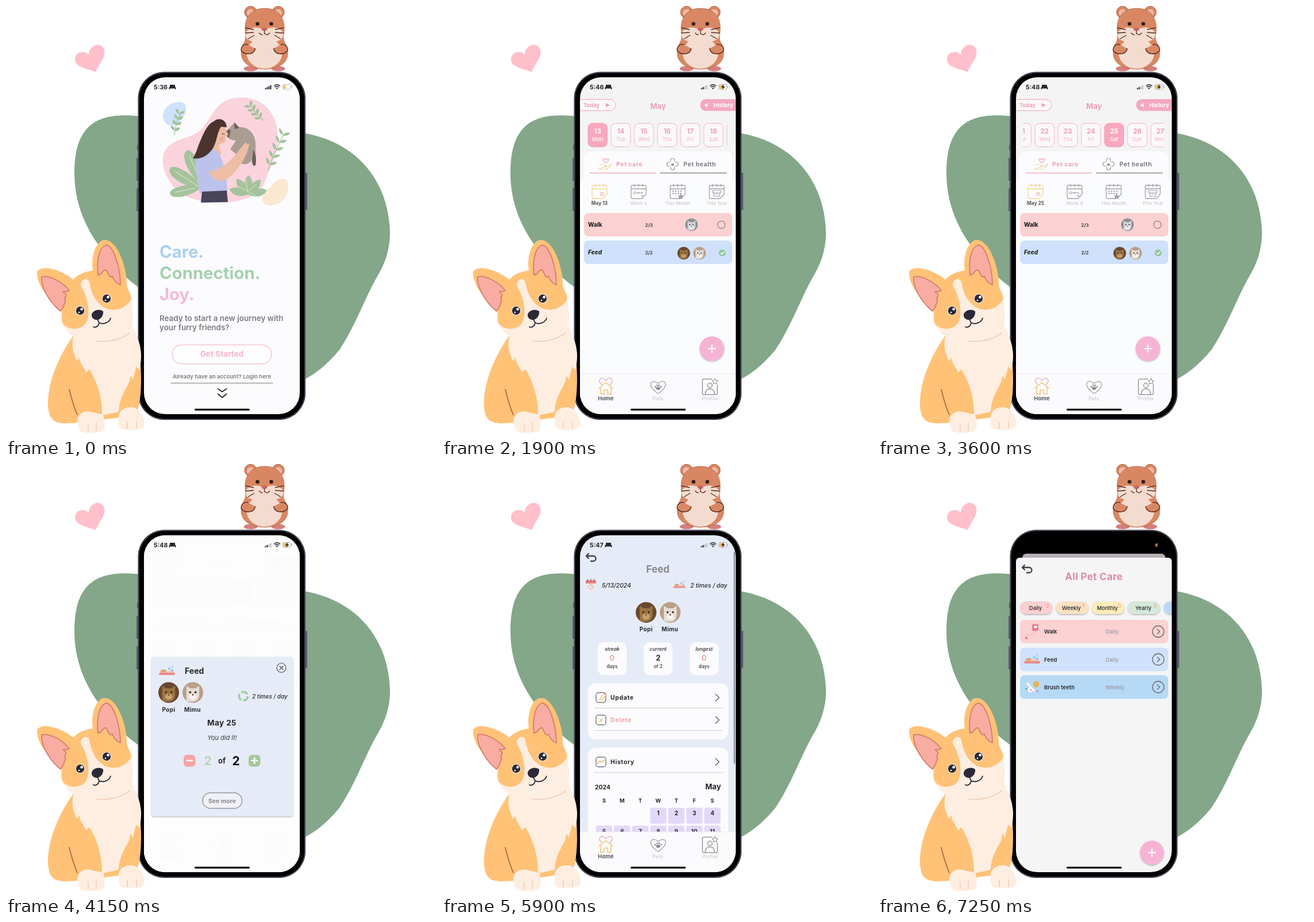
Write an HTML page that moves like this. It is 748 px wide and 748 px high and loops after 8000 ms.

```html
<!DOCTYPE html>
<html lang="en">
<head>
<meta charset="utf-8">
<title>Pet care app</title>
<style>
html,body{margin:0;width:100%;height:100%;overflow:hidden;background:#fff}
svg{display:block;width:100vw;height:100vh}
text{font-family:Inter,"Liberation Sans",sans-serif}
</style>
</head>
<body>
<svg id="stage" viewBox="0 0 748 748"></svg>
<script>
const stage = document.getElementById('stage');
const INK = '#27272b', PINK = '#ee9fb8', GREY = '#7b7b80', PALE = '#d3d3d6';
const PETS = ['Popi', 'Mimu'];

// Drawing helpers
const text = (x, y, size, str, fill = INK, {w = 700, mid, it, ls = 0} = {}) =>
  `<text x="${x}" y="${y}" font-size="${size}" font-weight="${w}" fill="${fill}" letter-spacing="${ls}"` +
  `${mid ? ' text-anchor="middle"' : ''}${it ? ' font-style="italic"' : ''}>${str}</text>`;
const mid = (x, y, size, str, fill, opt) => text(x, y, size, str, fill, {mid: 1, ...opt});
const rect = (x, y, w, h, r, fill, extra = '') =>
  `<rect x="${x}" y="${y}" width="${w}" height="${h}" rx="${r}" fill="${fill}" ${extra}/>`;
const oval = (x, y, rx, ry, fill, extra = '') =>
  `<ellipse cx="${x}" cy="${y}" rx="${rx}" ry="${ry}" fill="${fill}" ${extra}/>`;
const dot = (x, y, r, fill, extra) => oval(x, y, r, r, fill, extra);
const path = (d, fill, extra = '') => `<path d="${d}" fill="${fill}" ${extra}/>`;
const line = (d, color, w = 1, fill = 'none') =>
  path(d, fill, `stroke="${color}" stroke-width="${w}" stroke-linecap="round" stroke-linejoin="round"`);
const edge = (color, w = 1) => `stroke="${color}" stroke-width="${w}"`;
const group = (body, attrs = '') => `<g ${attrs}>${body}</g>`;
const at = (x, y, body) => group(body, `transform="translate(${x} ${y})"`);
const each = (n, fn) => Array.from({length: n}, (_, i) => fn(i)).join('');
const SHADOW = 'filter="url(#shadow)"';

const leaf = (x, y, len, w, angle, fill = '#a4c39b') =>
  path(`M0 0Q${len * .55} ${-w} ${len} 0Q${len * .55} ${w} 0 0`, fill, `transform="translate(${x} ${y}) rotate(${angle})"`);
const frond = (x, y, len, w, angle) => group(
  path(`M0 0C${len * .4} ${-w} ${len} ${-w} ${len} 0C${len} ${w * .7} ${len * .4} ${w} 0 0`, '#a4c39b') + line(`M4 0H${len * .85}`, '#dfecd5', 1),
  `transform="translate(${x} ${y}) rotate(${angle})"`);
const sprig = (x, y, len, angle, pairs, size) => group(
  line(`M0 0Q${len / 2} -4 ${len} 0`, '#9bbb93', 1.2) +
  each(pairs, i => {
    const p = len * (i + .7) / pairs;
    return leaf(p, -2, size, 5, -48) + leaf(p, -2, size, 5, 48);
  }), `transform="translate(${x} ${y}) rotate(${angle})"`);

function scenery() {
  const blob = path('M235 192C160 183 119 205 119 290C119 340 136 382 164 420C188 453 211 478 240 495L470 660' +
    'C505 664 546 640 580 598C609 555 625 505 649 465C663 440 668 416 668 395C666 300 605 232 510 220Z', '#83a788');
  const heart = path('M156 115C141 108 119 108 120 91C122 78 139 77 144 85C144 69 163 61 170 74C176 88 162 99 156 115Z', '#ffbfcb');
  return blob + heart;
}

function hamster() {
  const fur = '#d98763', brown = '#55291d', cream = '#f3dccf', foot = '#d67f7f';
  const side = (s, body) => group(body, `transform="translate(449.5 0) scale(${s} 1)"`);
  const half = s => side(s,
    oval(24, 109, 12, 4.5, foot) + dot(24, 11, 10.5, fur, edge('#a95c40')) + dot(24, 12, 6.5, '#f0b9a5'));
  const front = s => side(s,
    oval(15, 50, 18, 12.5, cream) + dot(12, 31, 3.3, '#33211d') +
    line('M16 74C18 85 33 86 40 78C42 72 36 65 29 67', brown, 1.4, fur) +
    line('M0 47Q4 53 9 47M19 41L33 38M19 46L33 47M18 51L28 57', brown, 1.3));
  return half(-1) + half(1) +
    path('M450 4C474 4 484 20 484 38C484 50 481 55 484 62C494 78 497 108 450 110C403 108 405 78 415 62C418 55 416 50 416 38C416 20 426 4 450 4Z', fur, edge('#b2684a', .8)) +
    oval(449.5, 82, 31, 27, cream) + front(-1) + front(1) +
    oval(449.5, 40.5, 5, 3, '#c4685c') + line('M449.5 43V48', brown, 1.3);
}

function corgi() {
  const gold = '#ffc277', cream = '#fdeee1', pink = '#f9aca2', rim = '#d27d6d', dark = '#2b2937';
  const eye = (x, y) => dot(x, y, 8.3, cream) + dot(x, y, 7.2, dark) + dot(x + 2.6, y - 2.6, 2.3, '#fff') + dot(x - 2, y + 3, 1.3, '#fff');
  return path('M118 572C95 604 73 650 73 690C73 718 82 726 104 726L128 725L225 712C237 690 237 640 231 590Z', gold) +
    path('M117 575C113 598 119 605 123 617C127 617 125 612 127 611C130 625 137 630 139 637C142 636 143 633 145 632C158 652 168 682 167 712L196 706C196 686 206 670 214 655C216 648 215 645 217 644L221 650C222 640 226 634 226 627L232 633C235 622 236 606 234 597C233 585 225 568 218 552Z', cream) +
    path('M124 725C124 709 135 704 147 706L169 711C174 725 173 741 163 741C150 744 132 744 128 737Z', cream) +
    path('M196 722C194 705 204 698 218 698C233 699 241 714 241 728C240 738 221 739 207 737C198 737 196 732 196 722Z', cream) +
    line('M110 667C115 687 119 700 124 711', '#a9683e', 1.7) +
    line('M143 739V727M157 739V725M211 735V724M227 735V723', '#efcdb7', 1.5) +
    path('M97 548C95 537 99 531 96 526C73 510 53 485 54 463C60 447 101 461 117 476C126 466 138 462 151 460C147 435 157 408 171 407C193 405 211 455 210 485C211 494 218 500 218 510C219 550 185 579 130 574C114 571 100 562 97 548Z', gold) +
    line('M62 471C77 467 101 483 110 495C105 499 99 494 100 498C108 502 104 506 102 507C107 515 99 518 101 521L95 531C78 518 60 490 62 471Z', rim, 1.8, pink) +
    line('M160 468C157 440 163 419 174 416C187 416 199 455 199 485C191 482 188 477 185 470C179 475 177 461 174 459C168 458 167 468 160 468Z', rim, 1.8, pink) +
    path('M131 480C136 473 143 473 145 481C149 503 158 518 174 526C193 533 210 524 218 510C220 526 223 544 219 556C208 577 181 584 148 584C121 582 103 567 97 549C105 565 128 565 138 553C149 539 142 505 131 488Q129 484 131 480Z', cream) +
    eye(129, 530) + eye(175, 509) +
    path('M149 539C148 530 162 525 169 531C170 539 164 546 158 546C153 546 150 543 149 539Z', dark) +
    line('M159 545L162 551C161 558 155 560 152 558M162 551C170 555 180 550 182 543', dark, 1.8) +
    line('M157 583C178 585 199 580 215 569', '#f0cdb8', 1.7);
}

function phone() {
  const key = (x, y, h) => rect(x, y, 3, h, 1, '#615d70');
  return key(228, 241, 10) + key(227, 264, 40) + key(227, 317, 40) + key(521, 290, 65) +
    rect(229.5, 114.5, 291.5, 605.5, 46, '#37343f') +
    rect(231, 116, 288.5, 602.5, 44.5, '#000', edge('#57536a', 1));
}

function statusBar(time, charging) {
  const bars = each(4, i => rect(450.5 + i * 3, 142.5 - i * 1.6, 2, 2.5 + i * 1.6, .5, charging && i > 1 ? '#bbb' : INK));
  return text(257, 145, 10.7, time) +
    path('M285 137H294V140L295.5 142V145H294V143.5H285V145H283.5V142L285 140Z', INK) + bars +
    line('M466.5 139Q471.5 134.5 476.5 139M468.5 141Q471.5 138.5 474.5 141', INK, 1.5) + dot(471.5, 143.3, 1.3, INK) +
    rect(481.5, 136.5, 14, 8.5, 2.5, charging ? '#f6f0e8' : '#fff', edge('#aaa', .8)) +
    rect(482.5, 137.5, charging ? 6 : 4, 6.5, 1.5, '#f6bd62') + rect(496.5, 139, 1.2, 3.5, .5, '#aaa') +
    (charging ? path('M490 136L485.5 141.5H488.5L487.5 145.5L492.5 140H489.5Z', INK) : '');
}

const back = (x, y) => at(x, y, line('M5 0L1 4L5 8M1 4H13C19 4 19 13 13 13H9', '#3f3f44', 2.3));
const fab = (x, y, r) => dot(x, y, r, '#f6b4d5', SHADOW) + line(`M${x - 6} ${y}H${x + 6}M${x} ${y - 6}V${y + 6}`, '#fff', 2.2);
const chevron = (x, y) => line(`M${x - 3} ${y - 6}L${x + 3} ${y}L${x - 3} ${y + 6}`, '#66666b', 1.5);

function avatar(x, y, r, [bg, fur, light]) {
  return dot(x, y, r, bg) + group(
    path('M-.62 .75V-.65L-.25-.4H.25L.62-.65V.35Q.5 .9 0 .9T-.62 .75Z', fur) +
    oval(0, .4, .36, .3, light) + dot(-.26, -.02, .1, '#3c3029') + dot(.26, -.02, .1, '#3c3029') + dot(0, .22, .08, '#6a4a40'),
    `transform="translate(${x} ${y}) scale(${r})"`);
}
const DOG = ['#8d9095', '#d4d5da', '#ececef'], TABBY = ['#68482f', '#9b7342', '#c6a16b'], WHITE = ['#b99f87', '#e5ddd5', '#f6f2ee'];

function bowl(x, y, s = 1) {
  return group(rect(-14, 3, 28, 4, 2, '#e88985') + rect(-12, 0, 24, 3, 1, '#f4c3ba') + oval(-6, 0, 5, 2.5, '#dba66f') +
    dot(4, -4, 2, '#8fc2e8') + dot(9, -7, 1.7, '#a8d1ef') + dot(9, -1, 2, '#8fc2e8'),
    `transform="translate(${x} ${y}) scale(${s})"`);
}

function bottomBar() {
  const heart = 'M0 5C-18-7-9-17 0-9C9-17 18-7 0 5Z';
  return rect(240, 640, 271, 70, 0, '#fbfbfd') + rect(240, 639.5, 271, 1, 0, '#ececef') +
    at(285, 663, line('M-7-4C-18-14-4-20 0-11C4-20 18-14 7-4', '#e5b3bf', 1.4) +
      line('M-12 2L0-8L12 2M-9 1V12H-3V5H3V12H9V1', '#f3d193', 2)) +
    at(376, 665, group(line(heart, '#a5a5a9', 1.1), 'transform="translate(0 3) scale(1.25)"') +
      oval(0, 0, 3.5, 2.8, '#8b8b90') + each(4, i => dot(-5 + i * 3.3, i % 3 ? -5 : -2.5, 1.4, '#8b8b90'))) +
    at(466, 662, line('M4-13H-10Q-13-13-13-10V11Q-13 14-10 14H10Q13 14 13 11V-3M-8 13Q-8 4 0 4T8 13', '#9a9a9f', 1.5) +
      dot(0, -2, 4, 'none', edge('#9a9a9f', 1.5)) + line('M9-14L10.5-11L14-10L11.5-8L12-4.5L9-6L6-4.5L6.5-8L4-10L7.5-11Z', '#9a9a9f', 1.1)) +
    mid(285, 686, 9.5, 'Home', '#58585d') + mid(375.5, 686, 9, 'Pets', PALE, {w: 600}) + mid(466, 686, 9, 'Profile', PALE, {w: 600});
}

function welcome() {
  const skin = '#eebda5', hair = '#4b342d', cat = '#a99d91', dusk = '#6c5c55';
  const art = path('M408 159C450 158 473 190 473 228C473 262 458 280 452 302C440 334 405 342 372 342C330 343 296 328 283 302C272 284 268 262 280 247C296 228 324 232 342 212C362 188 366 160 408 159Z', '#fad3dd') +
    path('M300 167C318 166 315 185 306 197C297 210 281 212 275 199C268 184 282 168 300 167Z', '#cfe2fb') +
    path('M478 301C492 298 494 317 487 331C480 346 455 353 447 341C440 327 456 321 462 312C467 306 470 302 478 301Z', '#fbe8d0') +
    sprig(293, 224, 40, -74, 4, 11) + sprig(448, 199, 36, -130, 4, 11) + sprig(456, 286, 70, -66, 5, 14) +
    frond(342, 314, 58, 13, 168) + frond(341, 318, 66, 15, 213) + frond(341, 312, 66, 15, 247) +
    each(5, i => leaf(421, 328, 34, 14, 196 + i * 38)) + line('M440 334L420 322L417 303M420 322L403 314M420 322L435 311', '#dfecd5', .9) +
    path('M385 216L397 203L404 211C423 209 436 224 434 247L435 270C432 281 427 276 429 266C421 281 402 277 402 259L390 249L400 234C390 234 383 228 382 222Z', cat) +
    path('M397 202L406 212L398 214ZM383 218Q386 214 391 216L388 229Q381 226 383 218ZM430 250Q437 262 434 277Q429 281 428 270Z', dusk) +
    path('M361 215C368 203 381 205 383 217L387 224L382 227L382 235C377 241 371 239 370 243L375 258L354 256Z', skin) +
    path('M332 258C342 244 366 245 372 259L382 286L385 323L337 326C333 300 326 274 332 258Z', '#bbc3ea') +
    path('M341 323L384 321L386 341L339 342Z', '#48445a') +
    path('M353 288C371 286 391 271 405 251L417 237L420 241L424 239L418 258C408 278 393 299 379 303C366 306 355 298 353 288Z', skin) +
    path('M384 211C383 196 369 193 361 201C349 206 343 224 337 237C332 249 332 254 325 265C341 268 357 257 363 241C367 231 368 219 374 210Z', hair) +
    line('M376 222L380 223', hair, 1.1) + dot(375, 231, 3, '#eba795');
  return rect(240, 124, 271, 586, 0, '#fcfcfe') + statusBar('5:36') + art +
    text(267, 438, 29.3, 'Care.', '#aad0f1') + text(267, 475, 29.3, 'Connection.', '#a6d0af') + text(267, 512, 29.3, 'Joy.', '#f7b8d5') +
    text(267, 548, 13.4, 'Ready to start a new journey with', GREY, {w: 600}) + text(267, 564, 13.4, 'your furry friends?', GREY, {w: 600}) +
    rect(289, 589.5, 173, 33, 16.5, '#fdfdff', edge('#f5c4d5', 1.5)) + mid(375.5, 609.5, 13.6, 'Get Started', '#f3b4cc') +
    mid(375.5, 648, 9.6, 'Already have an account? Login here', GREY, {w: 600}) + line('M287 656H464', '#77777b', 1.2) +
    line('M369 666L376 671L383.5 666M369 675L376 681L383.5 675', INK, 2);
}

function sheet(bg) {
  return rect(240, 124, 271, 586, 0, '#000') + rect(251, 156, 249, 30, 7, '#b4afb4') +
    path('M240 170Q240 163 247 163H504Q511 163 511 170V710H240Z', bg) +
    rect(482.5, 138.5, 4, 5, 1, '#d89a50') + rect(485, 140, 2, 2, 0, '#222') + back(250, 176);
}

function signIn() {
  const pencil = group(rect(-2, -13, 20, 27, 6, '#fab9c6') + rect(15, -13, 12, 27, 0, '#c9ccd0') + rect(27, -13, 66, 27, 0, '#cfe1f8') +
    rect(27, 7, 66, 7, 0, '#a9bdd6') + path('M93-13L116 3L93 14Z', '#fbd59a') + path('M107-3L119 5L106 9Z', '#f7afbd'),
    'transform="translate(322 231) rotate(40)"');
  const art = oval(383, 262, 24, 26, '#fae4f4') + line('M337 281Q352 270 367 292', '#b9c6e6', 8) +
    path('M336 228L327 195Q340 192 355 201ZM384 193Q400 179 413 182Q416 196 410 207Z', '#bcc4e8') +
    path('M340 222L329 198Q338 199 349 206ZM398 195Q407 186 412 186L408 203Z', '#fbe0f1') +
    path('M340 234C330 211 351 193 377 191C404 190 420 207 418 226C415 247 396 256 375 255C356 255 346 247 340 234Z', '#cfe2fa') +
    path('M341 232Q334 213 348 200Q341 220 350 246Z', '#9cbbd0') + pencil +
    line('M341 266L349 262M380 265Q393 264 397 255', '#b5bfe4', 11) +
    line('M361 231Q364 226 369 230M395 228Q398 223 402 226M376 229Q379 233 381 229Q384 233 387 228M352 238L363 235M355 243L364 239M402 232L413 229M403 235L413 235', '#3f4257', 1.8) +
    oval(365, 238, 5, 3, '#f4c8e4') + oval(402, 237, 4, 3, '#f4c8e4');
  const field = (y, label) => rect(271.5, y, 208, 34, 5, '#fcfcfe', edge('#f0ccd6', 1.3)) + text(279, y + 20.5, 9.5, label, '#d2d5da', {w: 400});
  return sheet('#fbfcff') + art + mid(375, 365, 17, 'Sign in', '#de8299', {ls: .3}) + field(392, 'Username') + field(440.5, 'Password') +
    rect(333, 510, 85, 35, 17.5, '#f7b6d6', SHADOW) + mid(375.5, 531, 10.7, 'Submit') +
    mid(375.5, 573, 11.1, 'Create Account', '#e192a9') + line('M329 580.5H422', '#e192a9', 1.5);
}

function calendarIcon(x, color, inner) {
  return at(x, 323, line('M-11-11H11Q13-11 13-8V4L6 12H-10Q-13 12-13 9V-8Q-13-11-11-11M-13-5H13M-7-13V-9M0-13V-9M7-13V-9', color, 1.3) + inner);
}

function home(time, day, week, strip) {
  const names = ['Sun', 'Mon', 'Tue', 'Wed', 'Thu', 'Fri', 'Sat'], g = '#a2a2a6';
  const dates = each(19, i => {
    const n = 13 + i, x = 254 + i * 40.3, on = n === day;
    return rect(x, 204, 33.5, 41, 8, on ? '#f7a8bf' : '#fbf8f9', edge(on ? '#f7a8bf' : '#f3c5d2', 1.3)) +
      mid(x + 16.7, 222, 11.5, n, on ? '#fff' : PINK) + mid(x + 16.7, 235, 9.2, names[(n + 2) % 7], on ? '#fff' : '#f2bccb', {w: 500});
  });
  const row = (y, fill, name, count, it) => rect(247, y, 258, 41, 8, fill) + text(254, y + 24, 10.2, name, '#111', {it}) + mid(360, y + 23.5, 8, count, '#444');
  const arms = [0, 90, 180, 270].map(a => group(line('M-3.5-5V-8Q0-12 3.5-8V-5', '#98989c', 1.2), `transform="rotate(${a})"`)).join('');
  return rect(240, 124, 271, 586, 0, '#f5f4f5') + rect(246, 253, 259, 420, 12, '#fcfcfe') + rect(240, 300, 271, 410, 0, '#fbfcfe') +
    statusBar(time, true) +
    rect(220, 162.5, 82, 19.5, 9.7, '#fbf8f9', edge('#f4bccd', 1.3)) + text(246, 176, 9.4, 'Today', PINK) + path('M285 169L292 172.5L285 176Z', PINK) +
    mid(376, 178.5, 13, 'May', PINK) + rect(449, 162, 80, 20.5, 10, '#f5a8c0') + path('M462 169V176L456 172.5Z', '#fff') + text(472, 176, 9.6, 'History', '#fff') +
    group(group(dates, `id="${strip}"`), 'clip-path="url(#strip)"') +
    at(284, 275, line('M1-2C-9-9-2-12 1-7C4-12 11-9 1-2Z', '#eba5b5', 1.2) + line('M-11 2L-5 0L3 4H-2M3 4L10 0Q12 1 8 5L2 9H-7L-11 8Z', '#f2d6a2', 1.2)) +
    text(303, 278.5, 10.5, 'Pet care', PINK, {ls: .5}) + line('M257 290.5H372', '#f1adc0', 1.4) +
    at(401, 275, arms + oval(0, 1, 2.5, 2, '#8a8a8e')) +
    text(420, 278.5, 10.5, 'Pet health', GREY, {ls: .5}) + line('M380 290.5H495', '#8a8a8e', 1.4) +
    calendarIcon(274, '#f5d593', dot(4, 4, 2.5, 'none', edge('#e6b5b5', 1.3))) +
    calendarIcon(342, g, line('M-6 2H6', g, 1) + dot(-7, 2, 2, '#fff', edge(g)) + dot(0, 2, 1.3, g) + dot(6, 2, 1.3, g) + dot(6, 7, 1.5, g)) +
    calendarIcon(410, g, each(8, i => dot(-8 + i % 4 * 4.5, -1 + (i >> 2) * 4, 1.3, g)) + line('M5 4L6 7H9L7 9L8 12L5 10L2 12L3 9L1 7H4Z', g, 1, g)) +
    calendarIcon(478, g, line('M-7-2H7V2H-7ZM-5 2V8H5V2M-2 4H2', g, 1.2)) +
    mid(274, 346, 8.3, 'May ' + day, '#555') + mid(342, 346, 8, 'Week ' + week, PALE) + mid(410, 346, 8, 'This Month', PALE) + mid(478, 346, 8, 'This Year', PALE) +
    row(360, '#fbd1d1', 'Walk', '2/3') + avatar(434, 380.5, 11, DOG) + dot(486, 380.5, 6.5, 'none', edge('#8b7474', 1.1)) +
    row(408, '#cfe0fb', 'Feed', '2/2', 1) + avatar(420.5, 430, 11, TABBY) + avatar(448, 430, 11, WHITE) +
    dot(487.5, 429.5, 6, '#94c59c') + line('M484.5 429.5L487 432L491 427', '#fff', 1.4) + fab(469.5, 596, 21.5) + bottomBar();
}

function modal() {
  const key = (x, fill, d) => rect(x, 506, 20.5, 20.5, 6, fill) + line(d, '#fff', 2.6);
  return rect(240, 124, 271, 586, 0, '#fdfdfd', 'opacity=".965"') + statusBar('5:48', true) + rect(253, 335.5, 246, 277, 4, '#e6ebf8', SHADOW) +
    bowl(280, 360) + text(311, 365, 14, 'Feed') + dot(479, 354.5, 8, 'none', edge('#555', 1.2)) + line('M476 351.5L482 357.5M482 351.5L476 357.5', '#555', 1.3) +
    avatar(283, 397.5, 18, TABBY) + avatar(325, 397.5, 18, WHITE) +
    mid(283, 431, 10, PETS[0], INK, {ls: .4}) + mid(324.5, 431, 10, PETS[1], INK, {ls: .4}) +
    dot(413, 404, 7.5, 'none', edge('#9bcf9f', 3.6) + ' stroke-dasharray="12 3.7"') + text(428, 408, 10, '2 times / day', INK, {w: 500, it: 1}) +
    mid(375.5, 454.5, 13.5, 'May 25', INK, {ls: .4}) + mid(376, 480, 11, 'You did it!', '#3c3c42', {w: 400, it: 1}) +
    key(309, '#f6a3a5', 'M314.5 516H324') + key(422, '#a5c89a', 'M427.5 516H437M432.2 511.3V520.8') +
    mid(351, 524, 21, '2', '#b3d7b8') + mid(375.5, 521, 13, 'of') + mid(400, 524, 21, '2', '#111') +
    rect(342, 572, 68.5, 27, 13.5, '#f1f2f7', edge('#98989d', 1.5)) + mid(376, 589.5, 10.5, 'See more', '#8a8a8f');
}

function details() {
  const days = each(31, i => {
    const col = (i + 3) % 7, row = (i + 3) / 7 | 0, x = 282 + col * 31.4, y = 598.5 + row * 31.4;
    return rect(x - 14.3, y, 28.6, 28, 4, '#e2d9f8', i === 25 ? edge('#e7a4c2', 1.4) : '') + mid(x, y + 13.5, 10, i + 1) +
      (i > 11 && i < 26 ? line(`M${x - 4} ${y + 22}L${x - 1.5} ${y + 25}L${x + 5} ${y + 18}`, '#fff', 1.7) : '');
  });
  const stat = (x, label, n, unit, color) => rect(x - 25, 311, 50, 57, 10, '#fcfcfe') + mid(x, 326, 8.5, label, INK, {w: 500, it: 1}) +
    mid(x, 343, 13, n, color) + mid(x, 356, 8.3, unit, '#333', {w: 500});
  const item = (y, label, color, icon) => rect(268, y - 8.5, 17, 17, 4, '#fff', edge('#77777c', 1.4)) + icon +
    text(293, y + 4, 10.5, label, color, {ls: .6}) + chevron(479, y) + line(`M265 ${y + 18.5}H488`, '#d5d5da', 1.2);
  const content = mid(375.5, 190, 17, 'Feed', '#88888d') + rect(250, 203, 18, 17, 2, '#f5e7df') + rect(250, 203, 18, 5.5, 1, '#e47f7c') +
    line('M253.5 201V205M259 201V205M264.5 201V205', '#8d6868', 1.2) + dot(259, 214, 4, '#fff', edge('#a8a8ae')) + line('M259 212V214H261', '#777', .9) +
    text(278, 215.5, 10.4, '5/13/2024', INK, {w: 500, it: 1}) + bowl(413, 211, .75) + text(432, 215.5, 10.4, '2 times / day', INK, {w: 500, it: 1}) +
    avatar(355, 259, 18, TABBY) + avatar(397, 259, 18, WHITE) + mid(355, 292, 10, PETS[0], INK, {ls: .4}) + mid(396.5, 292, 10, PETS[1], INK, {ls: .4}) +
    stat(296, 'streak', 0, 'days', '#eda59f') + stat(376, 'current', 2, 'of 2', INK) + stat(456, 'longest', 0, 'days', '#eda59f') +
    rect(254, 382, 244, 98, 14, '#fcfcfe') +
    item(407, 'Update', INK, line('M275 409L282 400L285 403L278 411L274 412Z', '#f1c17a', 1.3, '#fff')) +
    item(446, 'Delete', '#eda5a1', line('M274 444L279 449M279 444L274 449', '#f1c17a', 1.4)) +
    rect(254, 494, 244, 309, 14, '#fcfcfe') + item(519, 'History', INK, line('M271 522L275 517L278 520L282 515', '#f1b873', 1.5)) +
    text(266, 566.5, 10.4, '2024') + text(458, 566.5, 13, 'May') + each(7, i => mid(282 + i * 31.4, 590, 9.3, 'SMTWTFS'[i])) + days;
  return rect(240, 124, 271, 586, 0, '#e6ebf8') + group(content, 'id="scroller"') + statusBar('5:47', true) + back(250, 156) +
    '<rect id="thumb" x="507.5" y="152" width="2.2" height="369" rx="1" fill="#85868e"/>' + bottomBar();
}

function allCare() {
  const pill = (x, fill, label, n) => rect(x, 239, 56.5, 22, 11, fill, SHADOW) + mid(x + 27, 253.5, 9.4, label, '#222', {w: 500}) + mid(x + 48, 250, 8.5, n, '#eba59c', {w: 500});
  const row = (y, fill, label, freq, icon) => rect(247, y, 258, 41, 8, fill) + at(268, y + 20.5, icon) +
    text(289, y + 24, 9.5, label, INK, {w: 600}) + text(396, y + 24, 9.4, freq, '#98989f', {w: 500}) +
    dot(487.5, y + 20.5, 10, 'none', edge('#66666e', 1.3)) + line(`M486 ${y + 16.5}L490 ${y + 20.5}L486 ${y + 24.5}`, '#66666e', 1.4);
  return sheet('#f5f5f6') + mid(375.5, 202, 17, 'All Pet Care', '#dc8ba4', {ls: .35}) +
    pill(247, '#fbd0d1', 'Daily', 2) + pill(309.5, '#fbe0c3', 'Weekly', 1) + pill(372, '#fbecbb', 'Monthly', 0) + pill(434.5, '#d5e8d9', 'Yearly', 0) + pill(497, '#b9d9f7', '', '') +
    row(271, '#fad2d2', 'Walk', 'Daily', rect(0, -13, 11, 12, 3, '#e77f88') + rect(3, -10, 6, 4, 2, '#fff') + line('M5 0Q4 7-8 5', '#f2b9bd', 1.5) + dot(-10, 11, 2.2, '#e77f88')) +
    row(319.5, '#d0e1fb', 'Feed', 'Daily', bowl(0, 0)) +
    row(367.5, '#b6d9f6', 'Brush teeth', 'Weekly', dot(7, -5, 5.5, '#e6b35e') + line('M-8-6L3 6', '#f5f8ff', 4) + dot(-3, 5, 4, '#fff') + dot(-10, 3, 1.6, '#5ba2d8') + dot(-2, 5, 1.6, '#e77f88') + dot(9, 7, 1.7, '#e77f88')) +
    fab(476.5, 676, 21);
}

const screens = {welcome: welcome(), signIn: signIn(), home: home('5:46', 13, 2, 'stripA'), later: home('5:48', 25, 4, 'stripB'),
  modal: modal(), details: details(), allCare: allCare()};
const timeline = {welcome: [0, 1000], signIn: [1000, 1900], home: [1900, 3000], later: [3000, 5000], modal: [4000, 5000], details: [5000, 7000], allCare: [7000, 8000]};

stage.innerHTML = `<defs>
  <clipPath id="screen"><rect x="240" y="124" width="271" height="586" rx="37"/></clipPath>
  <clipPath id="strip"><rect x="252" y="200" width="246" height="50"/></clipPath>
  <filter id="shadow" x="-20%" y="-20%" width="140%" height="150%"><feDropShadow dx="0" dy="1.5" stdDeviation="1.2" flood-opacity=".28"/></filter>
</defs>` + scenery() + hamster() + phone() +
  group(Object.entries(screens).map(([id, body]) => group(body, `id="${id}"`)).join('') + rect(328, 700.5, 96, 3.2, 1.6, '#111'), 'clip-path="url(#screen)"') + corgi();

const node = id => document.getElementById(id);
const progress = (t, a, b) => Math.min(1, Math.max(0, (t - a) / (b - a)));
const smooth = p => p * p * (3 - 2 * p);

function draw(t) {
  for (const [id, [from, to]] of Object.entries(timeline)) node(id).style.display = t >= from && t < to ? '' : 'none';
  const dates = 343.6 * smooth(progress(t, 2900, 3350));
  node('stripB').setAttribute('transform', `translate(${-dates} 0)`);
  node('modal').setAttribute('opacity', progress(t, 3950, 4150));
  const scroll = smooth(progress(t, 5880, 6400));
  node('scroller').setAttribute('transform', `translate(0 ${-163 * scroll})`);
  node('thumb').setAttribute('y', 152 + 117 * scroll);
}

function loop() {
  draw(performance.now() % 8000);
  requestAnimationFrame(loop);
}
loop();
</script>
</body>
</html>
```
